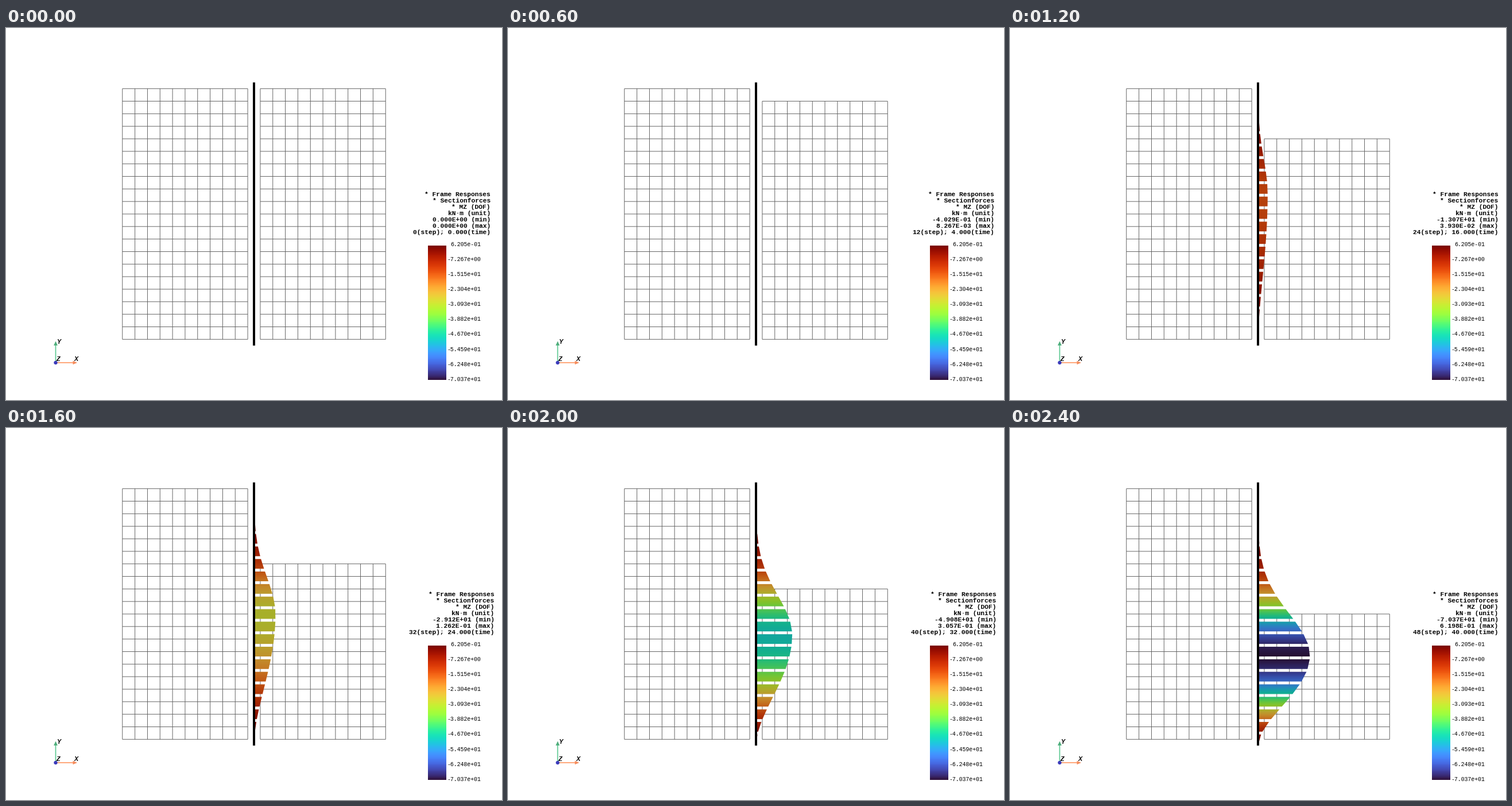
Write a matplotlib script that moves like this. It is 864x648 px and loops after 2450 ms.

```python
import numpy as np
import matplotlib.pyplot as plt
from matplotlib.animation import FuncAnimation
from matplotlib.collections import LineCollection, PolyCollection
from matplotlib.patches import Circle, Polygon

plt.rcParams["path.snap"] = False

W, H, DPI = 864, 648, 72          # at 72 dpi one point is one pixel
STEPS, INTERVAL = 49, 50
GRAVITY_STEPS, STEPS_PER_LIFT = 8, 4
CELL, ROWS, COLS = 21.83, 20, 10
WALL_X, MID_Y = W / 2, H / 2
TOP = MID_Y - ROWS / 2 * CELL
PX_PER_KNM = 1.29
TURBO = plt.get_cmap("turbo")
SHADE = 0.77                      # scene lighting on the diagram

# Extreme moments (kN·m) at a few excavation times.
KEY_TIMES = [0, 4, 10, 16, 24, 32, 40]
KEY_MIN = [0, -0.4029, -7.164, -13.07, -29.12, -49.08, -70.366]
KEY_MAX = [0, 0.008267, 0.01796, 0.0393, 0.1262, 0.3057, 0.6198]
BAR_MIN, BAR_MAX = KEY_MIN[-1], 0.6205

fig = plt.figure(figsize=(W / DPI, H / DPI), dpi=DPI, facecolor="white")
ax = fig.add_axes([0, 0, 1, 1])


def mesh(x0, removed=0):
    """Grid lines of a soil block with its top rows taken off."""
    x1, bottom = x0 + COLS * CELL, TOP + ROWS * CELL
    top = TOP + removed * CELL
    rows = [[(x0, TOP + r * CELL), (x1, TOP + r * CELL)]
            for r in range(removed, ROWS + 1)]
    cols = [[(x0 + c * CELL, top), (x0 + c * CELL, bottom)]
            for c in range(COLS + 1)]
    return rows + cols


def nodal_moments(time):
    """Bell above the peak, quartic run-out to the wall toe below it."""
    node = np.arange(ROWS + 2)
    peak = 5.55 + 0.206 * time
    d = node - peak
    above = np.exp(-d ** 2 / (10 + 0.288 * time))
    below = (1 - (d / (ROWS + 1 - peak)) ** 2) ** 2
    return np.interp(time, KEY_TIMES, KEY_MIN) * np.where(d < 0, above, below)


def diagram(time):
    """Pixel-high slices of the moment strips and their colours."""
    moments = nodal_moments(time)
    node_y = TOP + CELL * (np.arange(ROWS + 2) - 0.5)
    half = CELL / 2 * np.sqrt(0.6)     # outer Gauss points
    quads, values = [], []
    for mid in TOP + CELL * np.arange(ROWS + 1):
        a, b = mid - half, mid + half
        ys = np.r_[a, np.arange(np.ceil(a), b), b]
        ms = np.interp(ys, node_y, moments)
        xs = WALL_X - PX_PER_KNM * ms
        for i in range(len(ys) - 1):
            quads.append([(WALL_X, ys[i]), (xs[i], ys[i]),
                          (xs[i + 1], ys[i + 1]), (WALL_X, ys[i + 1])])
            values.append((ms[i] + ms[i + 1]) / 2)
    colors = TURBO((np.array(values) - BAR_MIN) / (BAR_MAX - BAR_MIN))
    colors[:, :3] *= SHADE
    return quads, colors


def draw_scalar_bar():
    ramp = np.linspace(1, 0, 256)[:, None]
    ax.imshow(ramp, cmap=TURBO, vmin=0, vmax=1, aspect="auto",
              extent=(735, 767, 613, 379), interpolation="nearest")
    for i, v in enumerate(np.linspace(BAR_MAX, BAR_MIN, 10)):
        ax.text(827.2, 380.3 + 26.03 * i, f"{v:.3e}", family="Liberation Mono",
                size=9.9, ha="right", va="baseline")


def draw_axes_marker():
    ox, oy = 86.5, 583
    ax.plot([ox, ox], [oy, 552], color="#5cc992", lw=1.7, zorder=4)
    ax.plot([ox, 117], [oy, oy], color="#ff9a66", lw=1.7, zorder=4)
    ax.add_patch(Polygon([(ox, 545.5), (ox - 3.4, 553), (ox + 3.4, 553)],
                         fc="#4fae7c", lw=0, zorder=4))
    ax.add_patch(Polygon([(124, oy), (116.5, oy - 3.2), (116.5, oy + 3.2)],
                         fc="#f58c5c", lw=0, zorder=4))
    ax.add_patch(Circle((ox, oy), 3.2, fc="#3b3bbb", lw=0, zorder=5))
    for name, x, y in (("Y", 92, 550), ("X", 122.3, 579.7), ("Z", 91, 579.7)):
        ax.text(x, y, name, family="Liberation Sans", size=10.8, weight="bold",
                style="italic", ha="center", va="baseline", zorder=6)


draw_scalar_bar()
draw_axes_marker()
right_x = WALL_X + CELL / 2
left_x = WALL_X - CELL / 2 - COLS * CELL
grid_style = dict(colors="#606060", linewidths=0.95, zorder=1)
ax.add_collection(LineCollection(mesh(left_x), **grid_style))
right_soil = ax.add_collection(LineCollection([], **grid_style))
strips = ax.add_collection(PolyCollection([], linewidths=0, zorder=2))
ax.plot([WALL_X, WALL_X], [TOP - CELL / 2, TOP + (ROWS + 0.5) * CELL],
        color="black", lw=4, solid_capstyle="butt", zorder=3)
info = [ax.text(0, 293.2 + 11 * i, "", family="Liberation Mono", size=11.25,
                weight="bold", ha="right", va="baseline") for i in range(7)]

ax.set_xlim(0, W)
ax.set_ylim(H, 0)
ax.axis("off")


def update(step):
    # The clock restarts when excavation follows the gravity steps.
    dig_time = max(step - GRAVITY_STEPS, 0)
    clock = dig_time or step
    removed = -(-dig_time // STEPS_PER_LIFT)

    right_soil.set_segments(mesh(right_x, removed))
    quads, colors = diagram(dig_time)
    strips.set_verts(quads)
    strips.set_facecolor(colors)

    lines = ["* Frame Responses", "* Sectionforces", "* MZ (DOF)", "kN·m (unit)",
             f"{np.interp(dig_time, KEY_TIMES, KEY_MIN):.3E} (min)",
             f"{np.interp(dig_time, KEY_TIMES, KEY_MAX):.3E} (max)",
             f"{step}(step); {clock:.3f}(time)"]
    right = 776.4 + 3.37 * len(lines[-1])
    for label, line in zip(info, lines):
        label.set_text(line)
        label.set_x(right)
    return [right_soil, strips, *info]


anim = FuncAnimation(fig, update, frames=STEPS, interval=INTERVAL,
                     repeat=True, repeat_delay=0, blit=False)
plt.show()
```
